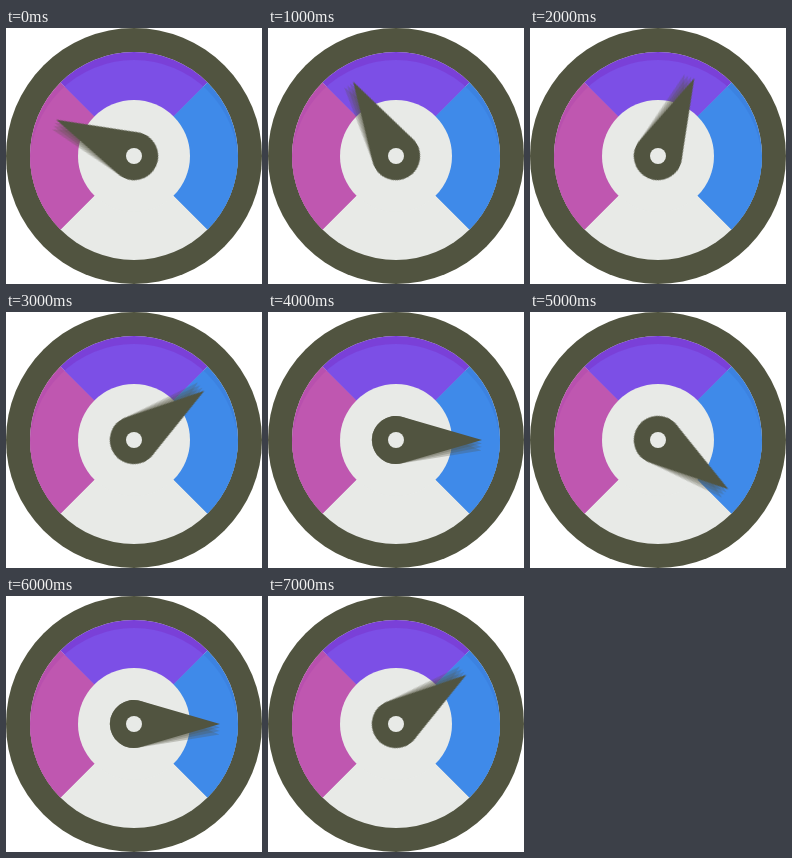
An HTML page for the animation above (8000 ms loop, 256x256 px).

```html
<!DOCTYPE html>
<html lang="en">
<head>
<meta charset="utf-8">
<title>Gauge</title>
<style>
  html, body { margin: 0; width: 100%; height: 100%; overflow: hidden; background: #fff; }
  svg { display: block; width: 100vw; height: 100vh; }
  .pink { fill: #bf57b0; }
  .violet { fill: #7c4fe6; }
  .blue { fill: #3f8ae9; }
  .shade .pink { fill: #b850ae; }
  .shade .violet { fill: #7a40d8; }
  .shade .blue { fill: #3c82e0; }
  .needle { fill: #515440; animation: swing 8s step-end infinite; }
  .trail { opacity: .27; }

  /* scaleY(-1) puts the trail on the clockwise side */
  @keyframes swing {
    0% { transform: rotate(-155deg); }
    12.5% { transform: rotate(-120deg); }
    25% { transform: rotate(-65deg); }
    37.5% { transform: rotate(-35deg); }
    50% { transform: rotate(0deg) scaleY(-1); }
    62.5% { transform: rotate(35deg) scaleY(-1); }
    75% { transform: rotate(0deg) scaleY(-1); }
    87.5%, 100% { transform: rotate(-35deg); }
  }
</style>
</head>
<body>
<svg viewBox="-128 -128 256 256">
  <defs>
    <clipPath id="face"><circle r="104"/></clipPath>
    <clipPath id="lit"><circle cy="8" r="104"/></clipPath>
    <g id="zones">
      <path class="pink" d="M0 0L-128 128V-128Z"/>
      <path class="violet" d="M0 0L-128 -128H128Z"/>
      <path class="blue" d="M0 0L128 -128V128Z"/>
    </g>
    <path id="hand" d="M86 0L6.7 23A24 24 0 1 1 6.7 -23Z"/>
  </defs>

  <circle r="128" fill="#515440"/>
  <circle r="104" fill="#e8eae7"/>
  <g clip-path="url(#face)">
    <g class="shade">
      <path class="pink" d="M0 0L-128 128V-128Z"/>
      <path class="violet" d="M0 0L-128 -128H128Z"/>
      <path class="blue" d="M0 0L128 -128V128Z"/>
    </g>
    <g clip-path="url(#lit)"><use href="#zones"/></g>
  </g>
  <circle r="56" fill="#e8eae7"/>

  <g class="needle">
    <use class="trail" href="#hand" transform="rotate(-7)"/>
    <use class="trail" href="#hand" transform="rotate(-4.7)"/>
    <use class="trail" href="#hand" transform="rotate(-2.4)"/>
    <use href="#hand"/>
  </g>
  <circle r="8" fill="#e8eae7"/>
</svg>
</body>
</html>
```
